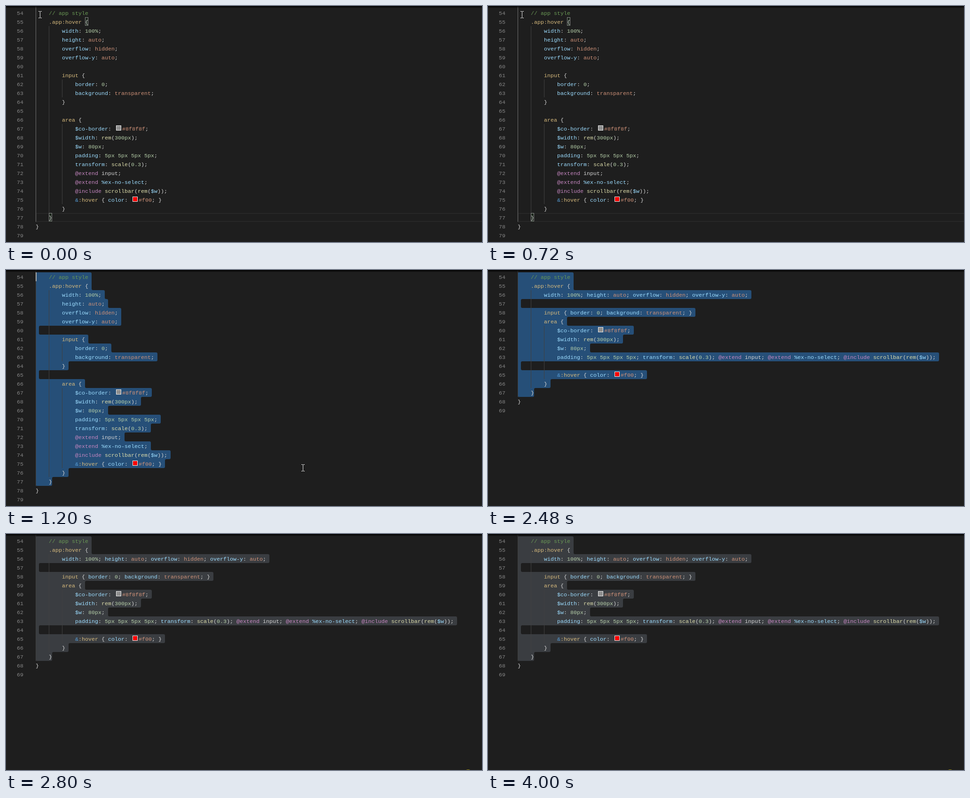
An HTML page with a canvas that plays this animation: 1012 by 504 pixels, repeating every 4800 ms.

```html
<!DOCTYPE html>
<html lang="en">
<head>
<meta charset="utf-8">
<title>SCSS formatting</title>
<style>
  html, body { margin: 0; width: 100%; height: 100%; overflow: hidden; background: #1e1e1e; }
  canvas { display: block; }
</style>
</head>
<body>
<canvas width="1012" height="504"></canvas>
<script>
const ctx = document.querySelector('canvas').getContext('2d');
const LEFT = 63, TOP = 5, ROW = 19, CHAR = 7, SWATCH = 16, FIRST_LINE = 54;

const messy = `    // app style
    .app:hover {
        width: 100%;
        height: auto;
        overflow: hidden;
        overflow-y: auto;

        input {
            border: 0;
            background: transparent;
        }

        area {
            $co-border: #8f8f8f;
            $width: rem(300px);
            $w: 80px;
            padding: 5px 5px 5px 5px;
            transform: scale(0.3);
            @extend input;
            @extend %ex-no-select;
            @include scrollbar(rem($w));
            &:hover { color: #f00; }
        }
    }
}
`.split('\n');

const tidy = `    // app style
    .app:hover {
        width: 100%; height: auto; overflow: hidden; overflow-y: auto;

        input { border: 0; background: transparent; }
        area {
            $co-border: #8f8f8f;
            $width: rem(300px);
            $w: 80px;
            padding: 5px 5px 5px 5px; transform: scale(0.3); @extend input; @extend %ex-no-select; @include scrollbar(rem($w));

            &:hover { color: #f00; }
        }
    }
}
`.split('\n');

// Ordered token rules: the first match wins
const rules = [
  [/\/\/.*/, '#6a9955'],
  [/@\w+/, '#c586c0'],
  [/#\w+/, '#ce9178'],
  [/\d[\d.]*(?:px|%)?/, '#b5cea8'],
  [/[\w-]+(?=\()/, '#dcdcaa'],
  [/[.\w:]+(?= \{)/, '#d7ba7d'],
  [/\$?[\w-]+(?=: )|\$\w+|%[\w-]+/, '#9cdcfe'],
  [/(?<=: )[a-z]+/, '#ce9178'],
  [/&/, '#569cd6'],
  [/\w+|[^\s\w]/, '#d4d4d4'],
];
const tokenPattern = new RegExp(rules.map(([re]) => `(${re.source})`).join('|'), 'g');

const rowTop = i => TOP + i * ROW;

function rect(x, y, w, h, color) {
  ctx.fillStyle = color;
  ctx.fillRect(x, y, w, h);
}

function text(str, x, row, color) {
  ctx.fillStyle = color;
  ctx.fillText(str, x, rowTop(row) + 14);
}

function drawLine(line, row) {
  text(FIRST_LINE + row, 23, row, '#858585');
  let shift = LEFT;
  for (const m of line.matchAll(tokenPattern)) {
    const kind = m.slice(1).findIndex(group => group !== undefined);
    if (m[0][0] === '#') {
      const x = shift + m.index * CHAR + 3;
      rect(x, rowTop(row) + 3, 11, 11, '#eee');
      rect(x + 1, rowTop(row) + 4, 9, 9, m[0] === '#f00' ? '#f00' : '#8f8f8f');
      shift += SWATCH;
    }
    text(m[0], shift + m.index * CHAR, row, rules[kind][1]);
  }
}

function drawGuides(lines, outerColor) {
  rect(LEFT, 0, 1, TOP, outerColor);
  lines.forEach((line, row) => {
    const indent = (line || lines[row + 1] || '').search(/\S/);
    for (let col = 0; col < indent; col += 4)
      rect(LEFT + col * CHAR, rowTop(row), 1, ROW, col ? '#404040' : outerColor);
  });
}

// Covers everything up to the second-last bracket, with rounded steps on the right
function drawSelection(lines, color) {
  const last = lines.length - 3;
  const points = [];
  for (let i = 0; i <= last; i++) {
    const right = LEFT + (lines[i].length + (i < last)) * CHAR + (lines[i].includes('#') ? SWATCH : 0);
    points.push([right, rowTop(i)], [right, rowTop(i + 1)]);
  }
  points.push([LEFT, rowTop(last + 1)], [LEFT, TOP]);
  ctx.beginPath();
  ctx.moveTo(LEFT + 3, TOP);
  points.forEach((p, i) => ctx.arcTo(...p, ...points[(i + 1) % points.length], 3));
  ctx.closePath();
  ctx.fillStyle = color;
  ctx.fill();
}

function drawBracketMatch(col, row) {
  const x = LEFT + col * CHAR;
  rect(x, rowTop(row), CHAR, ROW, 'rgba(0,100,0,.1)');
  ctx.strokeStyle = '#888';
  ctx.lineWidth = 1;
  ctx.strokeRect(x + .5, rowTop(row) + .5, CHAR - 1, ROW - 2);
}

function drawPointer(x, y) {
  for (const end of [y - 7, y + 7]) {
    rect(x - 3, end, 3, 1, '#e8e8e8');
    rect(x + 1, end, 3, 1, '#e8e8e8');
  }
  rect(x, y - 6, 1, 13, '#e8e8e8');
}

function draw(t) {
  const selected = t >= 1200, formatted = t >= 2000, blurred = t >= 2800;
  const lines = formatted ? tidy : messy;
  rect(0, 0, 1012, 504, '#1e1e1e');
  ctx.font = '11.667px "Liberation Mono", monospace';

  if (selected) {
    drawSelection(lines, blurred ? '#3a3d41' : '#264f78');
  } else {
    ctx.strokeStyle = '#282828';
    ctx.lineWidth = 2;
    ctx.strokeRect(LEFT + 1, rowTop(23) + 1, 960, ROW - 2);
  }
  drawGuides(lines, selected ? '#404040' : '#707070');
  if (!selected) {
    drawBracketMatch(15, 1);
    drawBracketMatch(4, 23);
  }
  lines.forEach(drawLine);

  const shadow = ctx.createLinearGradient(0, 0, 0, 5);
  shadow.addColorStop(0, '#000');
  shadow.addColorStop(1, 'transparent');
  rect(0, 0, 1012, 5, shadow);

  if (!selected) {
    drawPointer(72, 18);
  } else if (!formatted) {
    rect(LEFT, TOP, 2, ROW, '#aeafad');
    drawPointer(631, 422);
  }
  if (blurred) {
    ctx.fillStyle = '#a89a1c';
    ctx.beginPath();
    ctx.arc(982.5, 513, 10, 0, Math.PI * 2);
    ctx.fill();
  }
}

const start = performance.now();
function tick() {
  draw((performance.now() - start) % 4800);
  requestAnimationFrame(tick);
}
tick();
</script>
</body>
</html>
```
